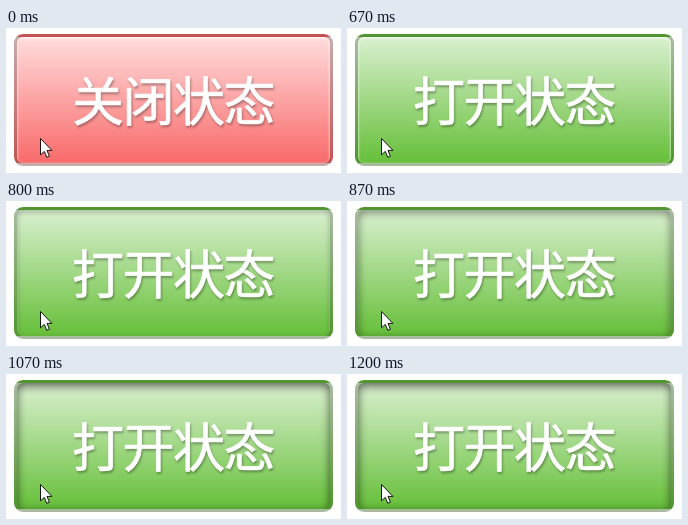
An HTML page that plays this animation: 335x145 px, repeating every 1.59 s.

```html
<!DOCTYPE html>
<html lang="zh-CN">
<head>
<meta charset="utf-8">
<title>Toggle button</title>
<style>
  html, body { margin: 0; width: 100%; height: 100%; overflow: hidden; background: #fff; }
  #button {
    --top: #ffdcdc;
    --bottom: #f96a6a;
    position: absolute;
    left: 8px;
    top: 6px;
    box-sizing: border-box;
    width: 319px;
    height: 132px;
    border: 3px solid rgba(0, 0, 0, .22);
    border-radius: 9px;
    background: linear-gradient(var(--top), var(--bottom));
  }
  #button.on { --top: #d9f0cf; --bottom: #66bf39; }
  svg { position: absolute; left: 0; top: 0; }
  text {
    font: 52px "Noto Sans CJK SC", "Noto Sans CJK JP", sans-serif;
    letter-spacing: -1.5px;
    fill: #fff;
    stroke: #fff;
    stroke-width: .7px;
    text-anchor: middle;
    filter: drop-shadow(1px 2px 1px rgba(0, 0, 0, .3));
  }
</style>
</head>
<body>
<div id="button"></div>
<svg width="335" height="145" viewBox="0 0 335 145">
  <text id="label" x="167" y="92.5">关闭状态</text>
  <path transform="translate(34.5 110.5)" fill="#fff" stroke="#000" stroke-width=".9"
    d="M0 0V16.3L3.8 12.9L6.3 18.8L8.9 17.7L6.5 11.9H11.4Z"/>
</svg>
<script>
const LOOP = 1590, SWITCH = 670, FADE = 400;
const button = document.getElementById('button');
const label = document.getElementById('label');

// The standard "ease" curve, solved by bisection
const bezier = (a, b, u) => 3 * a * u * (1 - u) ** 2 + 3 * b * u * u * (1 - u) + u ** 3;
function ease(p) {
  let lo = 0, hi = 1;
  for (let i = 0; i < 20; i++) {
    const mid = (lo + hi) / 2;
    if (bezier(.25, .25, mid) < p) lo = mid; else hi = mid;
  }
  return bezier(.1, 1, lo);
}

const px = v => v.toFixed(2) + 'px';
const inset = (y, blur, spread, grey, alpha) =>
  `inset 0 ${px(y)} ${px(blur)} ${px(spread)} rgba(${grey},${grey},${grey},${alpha.toFixed(3)})`;

function draw(t) {
  const on = t >= SWITCH;
  const k = on ? ease(Math.min(1, (t - SWITCH) / FADE)) : 0;
  const text = on ? '打开状态' : '关闭状态';
  button.classList.toggle('on', on);
  if (label.textContent !== text) label.textContent = text;
  // A pale rim gives way to a dark inner shadow
  button.style.boxShadow = [
    inset(1, 2, 1, 255, .5 * (1 - k)),
    inset(3 * k, 10 * k, 0, 0, .6 * k)
  ].join();
}

const start = performance.now();
function frame() {
  draw((performance.now() - start) % LOOP);
  requestAnimationFrame(frame);
}
frame();
</script>
</body>
</html>
```
